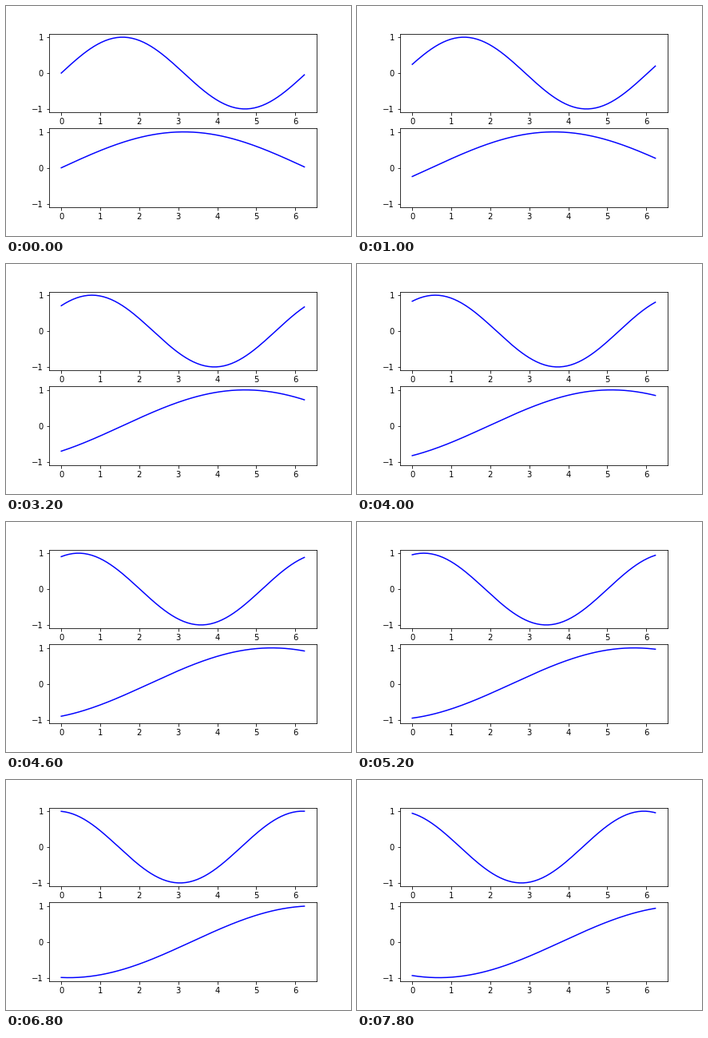
Write a matplotlib script that moves like this. It is 432x288 px and loops after 8 s.

```python
import numpy as np
import matplotlib.pyplot as plt
from matplotlib.animation import FuncAnimation

FRAMES = 40
STEP = 2 * np.pi / 128

plt.rcParams.update({"font.family": "DejaVu Sans", "font.size": 10})

x = np.arange(128) * STEP

fig, axes = plt.subplots(2, 1, figsize=(6, 4), dpi=72, facecolor="white")
fig.subplots_adjust(left=0.125, right=0.9, bottom=0.125, top=0.88, hspace=0.2)


def waves(i):
    shift = i * STEP
    return np.sin(x + shift), np.sin(x / 2 - shift)


margin = 0.05 * x[-1]
lines = []
for ax, y in zip(axes, waves(0)):
    lines += ax.plot(x, y, color="blue", linewidth=1.5)
    ax.set_xlim(-margin, x[-1] + margin)
    ax.set_ylim(-1.1, 1.1)
    ax.set_xticks(range(7))
    ax.set_yticks([-1, 0, 1])


def update(i):
    for line, y in zip(lines, waves(i)):
        line.set_ydata(y)
    return lines


anim = FuncAnimation(fig, update, frames=FRAMES, interval=200,
                     repeat=True, repeat_delay=0, blit=False)

plt.show()
```
